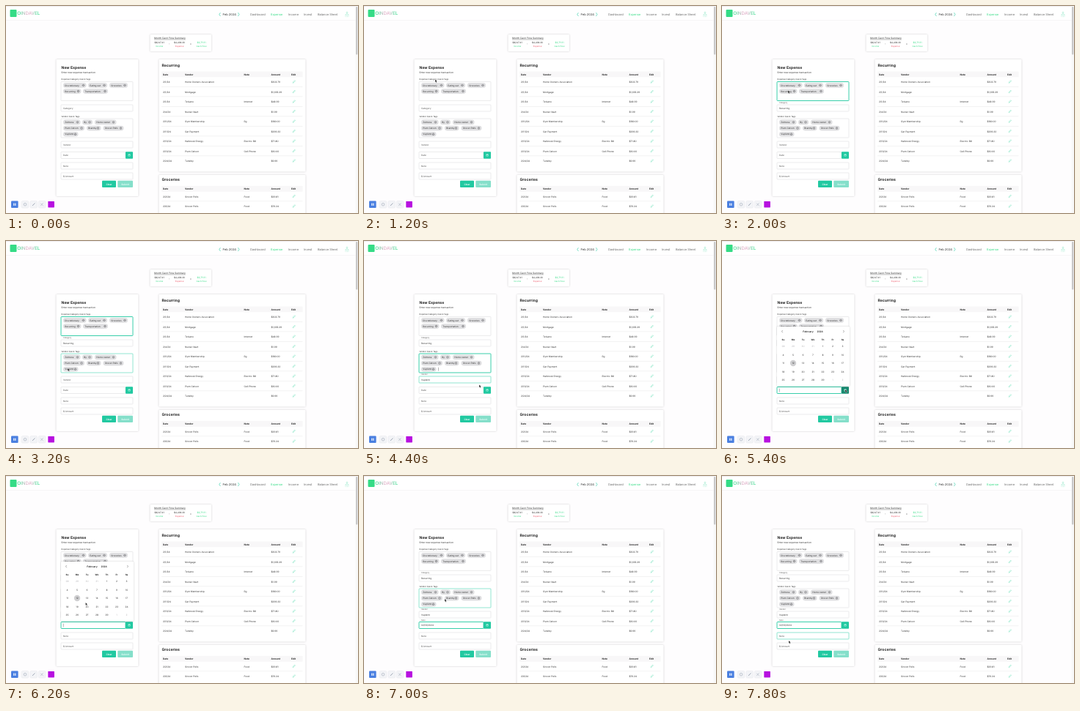
Animation of 480x283 px, one loop 8 s. Source, as an HTML page:

```html
<!DOCTYPE html>
<html lang="en">
<head>
<meta charset="utf-8">
<title>Expense form</title>
<style>
  html, body { margin: 0; width: 100%; height: 100%; overflow: hidden; background: #fefdfe; }
  svg { display: block; width: 100vw; height: 100vh; }
  text { font-family: Inter, "Open Sans", sans-serif; text-rendering: geometricPrecision; white-space: pre; }
  .card { filter: drop-shadow(0 .6px .8px rgba(0, 0, 0, .2)); }
</style>
</head>
<body>
<svg id="stage" viewBox="0 0 480 283" xmlns="http://www.w3.org/2000/svg"></svg>
<script>
const LOOP = 8000, STEP = 200;
const INK = '#333', GREEN = '#22c9a1', LIME = '#35dc86', LINE = '#d6d6d8';
const stage = document.getElementById('stage');

const text = (x, y, s, size = 3.2, fill = INK, extra = '') =>
  `<text x="${x}" y="${y}" font-size="${size}" fill="${fill}" ${extra}>${s}</text>`;
const bold = (x, y, s, size, extra = '') => text(x, y, s, size, '#222', 'font-weight="700" ' + extra);
const mid = (x, y, s, size, fill, extra = '') => text(x, y, s, size, fill, 'text-anchor="middle" ' + extra);
const rect = (x, y, w, h, fill, r = 0, extra = '') =>
  `<rect x="${x}" y="${y}" width="${w}" height="${h}" rx="${r}" fill="${fill}" ${extra}/>`;
const path = (d, stroke, w = .6, extra = '') =>
  `<path d="${d}" fill="none" stroke="${stroke}" stroke-width="${w}" stroke-linecap="round" ${extra}/>`;
const card = (x, y, w, h) => rect(x, y, w, h, '#fff', 1, 'class="card"');
const chevron = (x, y, dir, color, s = 1.2) =>
  path(`M${x - dir * s / 2} ${y - s * 1.5}l${dir * s} ${s * 1.5}l${-dir * s} ${s * 1.5}`, color, .6);

function header() {
  const nav = [[333, 'Dashboard'], [361, 'Expense'], [385, 'Income'], [406, 'Invest'], [425, 'Balance Sheet']];
  return rect(0, 0, 480, 19.3, '#fff') + rect(0, 19.3, 480, .5, '#efecef') + rect(0, 0, 480, .6, '#e6e2e6') +
    rect(5.5, 5, 9, 10, '#35dc86', 1) +
    text(15.3, 12.4, 'OINDAVEL', 6.2, 'url(#brand)', 'font-weight="500"') +
    chevron(291.5, 11.5, -1, GREEN, 1.4) + text(295.5, 13, 'Feb 2024', 4.1) + chevron(317.3, 11.5, 1, GREEN, 1.4) +
    nav.map(([x, s]) => text(x, 13.1, s, 4, s === 'Expense' ? LIME : '#666')).join('') +
    '<circle cx="465" cy="9" r="1" fill="none" stroke="#8fe5c4" stroke-width=".5"/>' +
    path('M462.8 12c.5-2 3.9-2 4.4 0z', '#8fe5c4', .5) + mid(465, 14.8, 'Guest', 2.1, '#a5e8cf') +
    rect(476.6, 0, 3.4, 283, '#f8f8f8') + rect(477.2, 1, 2.1, 65.5, '#c3c3c5', 1);
}

function summary() {
  const parts = [[209.2, '$8,147.41', 'Income', INK, LIME], [236.5, '$4,436.30', 'Expense', INK, '#ee5a6c'],
    [266.5, '$3,711.11', 'Cash Flow', LIME, LIME]];
  return card(196.5, 39, 83.5, 23) +
    text(202, 44.8, 'Month Cash Flow Summary', 3.3, INK, 'text-decoration="underline"') +
    parts.map(([x, v, s, a, b]) => mid(x, 50.7, v, 3.1, a) + mid(x, 56.3, s, 2.9, b)).join('') +
    mid(222.5, 53, '-', 3.4, INK) + mid(251.8, 53, '=', 3.4, INK);
}

function table(y, title, rows) {
  const heads = [[214, 'Date'], [244, 'Vendor'], [324.5, 'Note'], [361.5, 'Amount'], [389, 'Edit']];
  let s = bold(212.5, y, title, 5.1) + rect(212, y + 7, 192.5, 7.8, '#f8f7f8') +
    heads.map(([x, h]) => bold(x, y + 12, h, 3.2)).join('');
  rows.forEach(([date, vendor, note, amount], i) => {
    const b = y + 22.5 + 13.5 * i;
    s += text(214, b, date) + text(244, b, vendor) + text(324.5, b, note) + text(361.5, b, amount) +
      path(`M391.3 ${b}l.4-1.3 2-2 .8.8-2 2z`, '#58dcae', .45) +
      (i < rows.length - 1 ? rect(212, b + 5.2, 192.5, .4, '#e2e0e2') : '');
  });
  return s;
}

function tables() {
  return card(208.5, 73, 200, 153.5) + card(208.5, 231, 200, 60) +
    table(82.5, 'Recurring', [
      ['2/1/24', 'Home Owners Association', '', '$302.79'],
      ['2/1/24', 'Mortgage', '', '$1,635.29'],
      ['2/1/24', 'Telvano', 'Internet', '$48.99'],
      ['2/4/24', 'Nuvlar Vault', '', '$1.99'],
      ['2/10/24', 'Gym Membership', 'Rg', '$180.00'],
      ['2/11/24', 'Car Payment', '', '$296.32'],
      ['2/13/24', 'Halbrook Energy', 'Electric Bill', '$71.80'],
      ['2/13/24', 'Plum Celvon', 'Cell Phone', '$30.00'],
      ['2/24/24', 'Tunelby', '', '$9.99']]) +
    table(239, 'Groceries', [
      ['2/2/24', 'Grocer Pells', 'Food', '$29.81'],
      ['2/6/24', 'Grocer Pells', 'Food', '$76.24']]);
}

function tools() {
  const box = x => rect(x, 266.5, 9.6, 9.6, '#f3f4f7', 1.5, 'stroke="#e2e3e8" stroke-width=".4"');
  return rect(7, 266.5, 9.6, 9.6, '#4a7fe0', 1) + rect(10.2, 269.6, 1.1, 3.4, '#fff') + rect(12.3, 269.6, 1.1, 3.4, '#fff') +
    box(21.2) + box(32.9) + box(44.4) +
    '<circle cx="26" cy="271.3" r="1.8" fill="none" stroke="#8d96a8" stroke-width=".5"/>' +
    path('M36.2 272.8l3-3', '#8d96a8', .8) + path('M47.4 272.8l3-3M47.5 270l1 1M49.5 272l1 1', '#8d96a8', .5) +
    rect(57.3, 267, 8.6, 8.4, '#b711e0', .6);
}

const tag = (x, y, w, s) => rect(x, y, w, 6.7, '#dfdfe1', 3.3) + text(x + 2.3, y + 4.5, s, 3.1) +
  `<circle cx="${x + w - 4}" cy="${y + 3.35}" r="1.7" fill="#8a8a8e"/>` +
  path(`M${x + w - 4.7} ${y + 2.65}l1.4 1.4m0-1.4l-1.4 1.4`, '#fff', .4);

const catTags = [[78, 105, 31.5, 'Discretionary'], [112, 105, 26, 'Eating out'], [141, 105, 25, 'Groceries'],
  [78, 113.2, 24.5, 'Recurring'], [105, 113.2, 34, 'Transportation']].map(a => tag(...a)).join('');
const vendorTags = [[78, 155.5, 23.5, 'Zelmora'], [104, 155.5, 14, 'By'], [121, 155.5, 29.5, 'Home owner'],
  [78, 163.7, 29, 'Plum Celvon'], [110, 163.7, 19.5, 'Bramby'], [132.5, 163.7, 28, 'Grocer Pells'],
  [78, 171.9, 20.5, 'Vuplenn']].map(a => tag(...a)).join('');

// time, x, y of the pointer tip
const track = [[200, 232, 66], [1200, 97, 100.5], [1800, 90, 115.5], [2200, 90, 115.5], [3000, 84, 174],
  [3800, 85, 174], [4400, 157, 196.5], [4800, 168, 203], [5400, 168, 203], [6200, 108.5, 173],
  [6600, 110, 167], [7000, 110, 168], [7600, 93, 219], [7800, 91, 225], [8000, 91, 225]];

function pointer(t) {
  if (t < track[0][0]) return null;
  const i = Math.max(1, track.findIndex(k => k[0] >= t));
  const [t0, x0, y0] = track[i - 1], [t1, x1, y1] = track[i];
  const k = (t - t0) / (t1 - t0);
  return [x0 + (x1 - x0) * k, y0 + (y1 - y0) * k];
}

function drawPointer(t) {
  const p = pointer(t);
  if (!p) return '';
  return `<path transform="translate(${p})" d="M0 0v3.7l.9-.8.7 1.5.7-.3-.7-1.5h1.2z" fill="#111" stroke="#fff" stroke-width=".3"/>`;
}

function calendar() {
  const col = i => 83.5 + 13.5 * i;
  let s = rect(75, 117, 99, 81.5, '#fff', 1.2, 'class="card"') +
    chevron(82, 123.6, -1, '#777', .9) + chevron(166, 123.6, 1, '#777', .9) +
    mid(117.5, 124.8, 'February', 3.3, '#222', 'font-weight="600"') + mid(133.6, 124.8, '2024', 3.3, '#222', 'font-weight="600"') +
    ['Su', 'Mo', 'Tu', 'We', 'Th', 'Fr', 'Sa'].map((d, i) => mid(col(i), 136, d, 3, '#222', 'font-weight="700"')).join('') +
    `<circle cx="${col(1)}" cy="167" r="4.2" fill="#cfcfd1"/>`;
  for (let i = 0; i < 35; i++) {
    const day = i - 3, inside = day > 0 && day < 30;
    const label = day < 1 ? day + 31 : day > 29 ? day - 29 : day;
    s += mid(col(i % 7), 145.1 + 11.5 * Math.floor(i / 7), label, 3.2, inside ? INK : '#b5b5b8');
  }
  return s;
}

function form(t) {
  const open = t >= 5400 && t < 6600;
  const inside = (p, x, y, w, h) => p && p[0] >= x && p[0] <= x + w && p[1] >= y && p[1] <= y + h;
  const box = (y, h, focus, w = 98, soft = false) => {
    const over = !open && [t, t - STEP].some(m => inside(pointer(m), 75, y, w, h));
    return rect(75, y, w, h, '#fff', .8,
      `stroke="${focus || over ? GREEN : soft ? '#9fd8cc' : LINE}" stroke-width="${focus ? .9 : .5}"`);
  };
  const field = (y, label, value, focus, w) => box(y, 9, focus, w) +
    (value ? text(78, y - 2, label, 2.6, '#555') + text(78, y + 5.7, value, 3.1)
      : focus ? path(`M78.3 ${y + 2.5}v4`, '#444', .4) : text(78, y + 5.7, label, 3.1, '#555'));
  const hot = t >= 4800 && t < 5600;

  return text(75.5, 101.2, 'Expense Category Quick Tags', 2.8) +
    box(103.5, 26, t >= 2000 && t < 3600) + catTags +
    field(135, 'Category', t >= 2000 && 'Recurring') +
    text(75.5, 151.7, 'Vendor Quick Tags', 2.8) +
    box(154, 26, t >= 3600 && t < 4800, 98, t >= 4800 && t < 5200) + vendorTags +
    (t >= 3600 && t < 4800 ? path('M101.5 173.2v4', '#444', .4) : '') +
    field(185, 'Vendor', t >= 3600 && 'Vuplenn') +
    field(199.5, 'Date', t >= 6600 && '02/13/2024', t >= 5400, 88) +
    rect(163, 199.2, 10, 9.6, hot ? '#188a70' : GREEN, .8) +
    rect(166.8, 202.8, 2.5, 2.5, 'none', .3, 'stroke="#d9fff4" stroke-width=".45"') + rect(166.8, 202.8, 2.5, .8, '#d9fff4') +
    field(214, 'Note') + field(228, '$ Amount') +
    rect(131, 238.7, 19, 9.4, GREEN, 1) + mid(140.5, 244.5, 'Clear', 3.2, '#fff', 'font-weight="600"') +
    rect(152.3, 238.7, 20.7, 9.4, '#85dfca', 1) + mid(162.6, 244.5, 'Submit', 3.2, '#eafffa', 'font-weight="600"') +
    (open ? calendar() : '') + drawPointer(t);
}

stage.innerHTML = `<defs><linearGradient id="brand">
    <stop offset=".1" stop-color="#45dc94"/><stop offset=".4" stop-color="#e2b3cb"/>
    <stop offset=".62" stop-color="#e2b3cb"/><stop offset=".85" stop-color="#45dc94"/>
  </linearGradient></defs>` +
  rect(0, 0, 480, 283, '#fefdfe') + header() + summary() + tables() + tools() +
  card(68.5, 73, 112, 187) + bold(75.5, 86, 'New Expense', 5.1) +
  text(75.5, 92.2, 'Enter new expense transaction', 3.2) + '<g id="live"></g>';

const live = document.getElementById('live');
const start = performance.now();
let shown = -1;

function tick(now) {
  const t = Math.floor(Math.max(0, now - start) % LOOP / STEP) * STEP;
  if (t !== shown) live.innerHTML = form(shown = t);
  requestAnimationFrame(tick);
}
tick(start);
</script>
</body>
</html>
```
